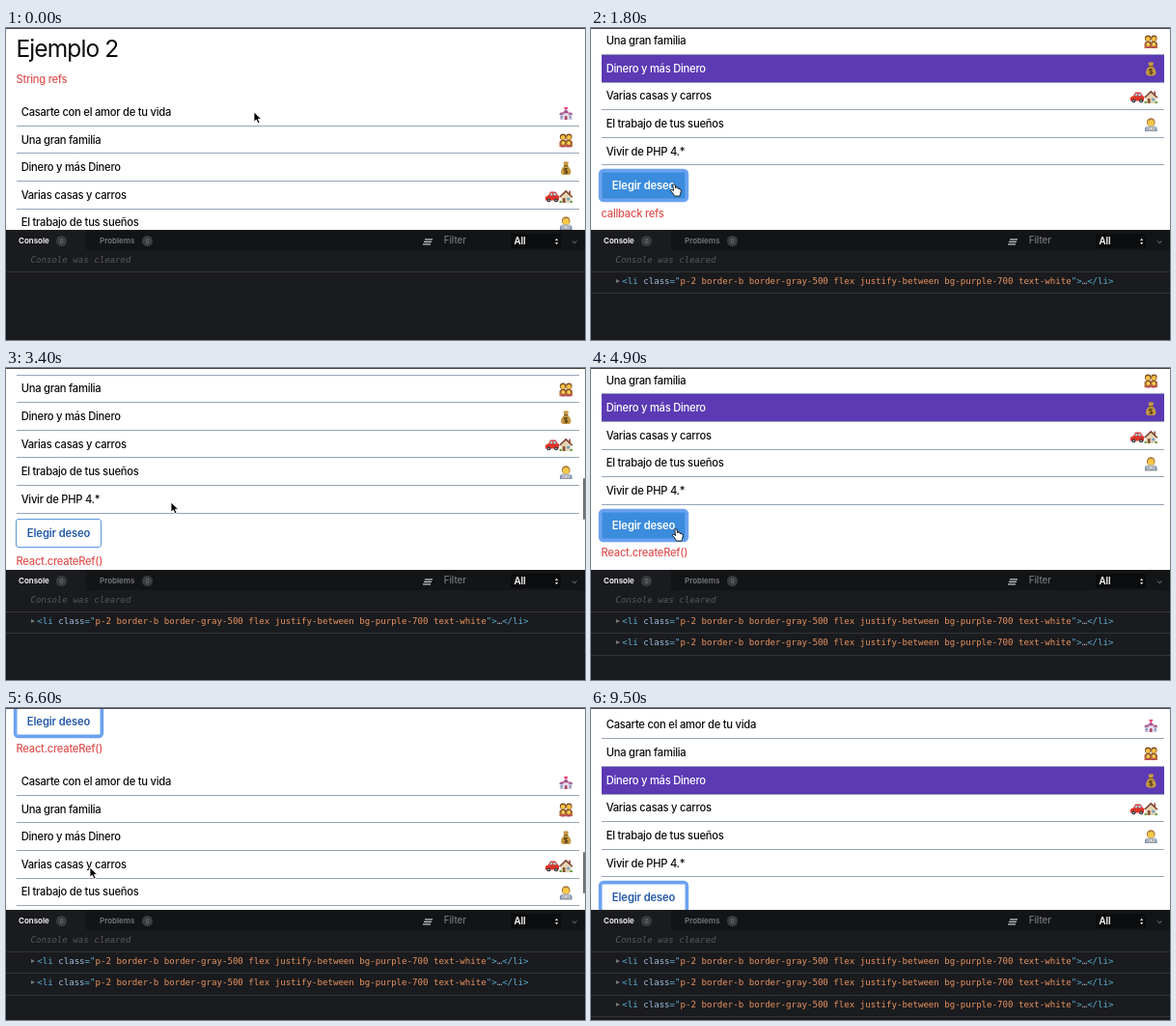
Recreate the animation shown at these times as an HTML page. Size 600 px wide and 323 px high, loop 9.6 s.

```html
<!DOCTYPE html>
<html lang="es">
<head>
<meta charset="utf-8">
<title>Ejemplo 2</title>
<style>
html, body { margin: 0; width: 100%; height: 100%; overflow: hidden; background: #fff; }
#stage { position: relative; width: 600px; height: 323px; overflow: hidden; font: 450 11.2px/20px Inter, Roboto, sans-serif; letter-spacing: -.25px; color: #0b0b0d; }
#stage * { box-sizing: border-box; white-space: pre; }
#page, #bar, #cursor, .section, .section > *, #console, #console > * { position: absolute; margin: 0; }
#page { left: 0; top: 0; width: 600px; }
h1 { position: absolute; left: 10.5px; top: 6px; margin: 0; font: 24.5px/30px Inter, Roboto, sans-serif; letter-spacing: -.9px; }
.section { left: 10.5px; width: 583.5px; }
.section p { top: -10px; left: 0; color: #e05252; }
ul { top: 20.1px; left: 0; width: 100%; padding: 0; list-style: none; }
li { height: 28.65px; padding: 0 6.3px 0 5.2px; line-height: 28px; display: flex; justify-content: space-between; align-items: center; border-bottom: 1px solid #96a3b8; }
li.picked { background: #5b3ab4; color: #fff; }
li svg { width: 14.5px; height: 14.5px; display: inline-block; vertical-align: middle; }
button { top: 197.5px; left: -.4px; width: 89px; height: 30px; padding: 0; border: 1px solid #5b9ade; border-radius: 3px; background: #fff; color: #2359a6; font: 600 11.2px/28px Inter, Roboto, sans-serif; letter-spacing: -.1px; }
button.hover { background: #3b8cdd; color: #fff; }
button.focus { border-color: #6ba2ef; box-shadow: 0 0 0 2.2px #6ba2ef, inset 0 0 0 .5px #6ba2ef; }
#bar { left: 597.7px; width: 2.3px; height: 43px; background: #747474; border-radius: 1px; }
#edge { position: absolute; top: 0; left: 0; width: 600px; height: 1px; background: #444; }
#console { top: 209px; left: 0; width: 600px; height: 114px; background: #1a1b1e; letter-spacing: 0; }
#head { left: 0; top: 0; width: 600px; height: 21px; background: #131416; }
#tab { left: 0; top: 0; width: 83px; height: 21px; background: #1a1b1e; }
.label { top: 1px; font-size: 8px; font-weight: 600; }
.badge { top: 5.5px; width: 11px; height: 11px; border-radius: 50%; background: #3a3c40; color: #77797d; font-size: 6px; line-height: 11px; text-align: center; }
#select { left: 523px; top: 4px; width: 52px; height: 15px; background: #0b0c0d; border-radius: 2px; }
#icons { left: 0; top: .5px; }
.mono, .log { left: 0; width: 600px; font: 9.1px/21px "DejaVu Sans Mono", "Liberation Mono", monospace; border-bottom: 1px solid #303338; }
.mono { top: 21px; height: 23px; padding-left: 25.5px; color: #55585c; font-style: italic; }
.log { height: 22.4px; line-height: 18.6px; padding-left: 32.3px; color: #5db0d7; }
.log::before { content: ""; position: absolute; left: 25.7px; top: 7px; border: 2.5px solid transparent; border-left: 4px solid #77797d; border-right: 0; }
.log i { font-style: normal; color: #9bbbdc; }
.log b { font-weight: normal; color: #e8935f; }
.log u { text-decoration: none; color: #a5a8ac; }
#cursor { width: 14px; height: 16px; overflow: visible; }
</style>
</head>
<body>
<div id="stage">
  <div id="page"><h1>Ejemplo 2</h1></div>
  <div id="bar"></div>
  <div id="edge"></div>
  <div id="console">
    <div id="head"></div>
    <div id="tab"></div>
    <div class="label" style="left:13px;color:#fff">Console</div>
    <div class="badge" style="left:52.3px">0</div>
    <div class="label" style="left:97px;color:#77797d">Problems</div>
    <div class="badge" style="left:141.3px">0</div>
    <div class="label" style="left:453.7px;color:#77797d;font-size:9.7px;font-weight:500">Filter</div>
    <div id="select"></div>
    <div class="label" style="left:526.5px;top:2px;color:#fff;font-size:9.7px">All</div>
    <svg id="icons" width="600" height="21" fill="none" stroke="#c4c6c9">
      <path d="M434 8.8h8M433 11.3h8M432 13.8h8" stroke-width="1.2"/>
      <path d="M569 10l1.6-2.3 1.6 2.3zM569 12l1.6 2.3 1.6-2.3z" fill="#ddd" stroke="none"/>
      <path d="M587 10.5l2.2 2.2 2.2-2.2" stroke="#8b8d91"/>
    </svg>
    <div class="mono">Console was cleared</div>
  </div>
  <svg id="cursor" stroke-linejoin="round">
    <path id="arrow" d="M0 0v10.2l2.4-2.2 1.7 3.8 1.9-.8-1.7-3.7h3.3z" fill="#000" stroke="#fff" stroke-width=".8"/>
    <path id="hand" d="M-1.2 .3Q0-1 1.1 .3L1.7 4Q3-.1 4 4.3 5.4 3.3 5.9 5 7.4 4.3 7.4 6.4L6.6 9.6 6 12H.6L-1.4 8.8-3.7 6.2Q-3.4 4.7-1.7 5.6L-.5 6.6z" fill="#fff" stroke="#111" stroke-width=".9"/>
  </svg>
</div>
<script>
const LOOP = 9600, STEP = 100, PITCH = 241, FIRST = 53;
const $ = id => document.getElementById(id);

const icons = {
  church: `<path d="M1 7.5h12v6H1z" fill="#c9c3d8"/><path d="M4 5.5h6v8H4z" fill="#e3dfea"/>
    <path d="M0 8.5l1.5-2.3h3V8.5zM14 8.5l-1.5-2.3h-3V8.5zM3.2 7L7 3.2 10.8 7z" fill="#a9568e"/>
    <path d="M7 4L5 1.8Q5.3 0 7 1 8.7 0 9 1.8z" fill="#ee3f78"/>
    <path d="M5.7 13.5V10.5Q7 8.5 8.3 10.5v3z" fill="#b04a6c"/><path d="M2 9.8h1.3v2H2zm8.7 0H12v2h-1.3z" fill="#687fb5"/>`,
  family: `<g fill="#7a4a24"><circle cx="4" cy="3.5" r="3.1"/><circle cx="10" cy="3.5" r="3.1"/></g>
    <g fill="#f6c242"><circle cx="4" cy="4.3" r="2.3"/><circle cx="10" cy="4.3" r="2.3"/></g>
    <path d="M.5 13.5V9q0-2 3-2h7q3 0 3 2v4.5z" fill="#b9683b"/>
    <g fill="#7a4a24"><circle cx="4.2" cy="9" r="2.5"/><circle cx="9.8" cy="9" r="2.5"/></g>
    <g fill="#ffd153"><circle cx="4.2" cy="9.7" r="1.9"/><circle cx="9.8" cy="9.7" r="1.9"/></g>
    <path d="M2 14q0-2.2 2.2-2.2T6.5 14zm5.5 0q0-2.2 2.3-2.2T12 14z" fill="#b84861"/>`,
  money: `<path d="M5.3 4.5L4.3 1Q7-.3 9.7 1L8.7 4.5Q12.3 7.5 12 11.5 11.5 14 7 14T2 11.5Q1.7 7.5 5.3 4.5z" fill="#c49a45"/>
    <path d="M4.9 4h4.2v1.2H4.9z" fill="#7d581f"/>
    <path d="M8.8 7.8Q5.2 6.6 5.2 8.4c0 1.6 3.5.9 3.5 2.5Q8.7 12.4 5 11.4M7 6.7v6" fill="none" stroke="#5b3e10"/>`,
  car: `<path d="M3 6l2-3.5h5L12.5 6l1.5 1v4H0V7.5z" fill="#dc3529"/>
    <path d="M4.2 6l1.3-2.5H7V6zM8 3.5h1.6L11.3 6H8z" fill="#9fd2ec"/>
    <g fill="#303137"><circle cx="3.3" cy="11" r="1.9"/><circle cx="10.7" cy="11" r="1.9"/></g>
    <g fill="#bbb"><circle cx="3.3" cy="11" r=".8"/><circle cx="10.7" cy="11" r=".8"/></g>`,
  house: `<path d="M2 6.5l5-4.5 5 4.5v7H2z" fill="#e4d3b4"/><path d="M10 1.5h1.6v4H10z" fill="#9a4a35"/>
    <path d="M0 7.5L7 .8l7 6.7-1 1-6-5.6-6 5.6z" fill="#7d4234"/>
    <path d="M3.7 8.8h2.6v4.7H3.7z" fill="#87512e"/><path d="M8 8.5h2.7V11H8z" fill="#6da3c8"/>
    <g fill="#5d9c3e"><circle cx="12.3" cy="12.6" r="1.2"/><circle cx="1.6" cy="12.6" r="1.2"/></g>`,
  worker: `<circle cx="7" cy="4.5" r="4.2" fill="#a8793a"/>
    <circle cx="7" cy="5.2" r="3.2" fill="#f8c947"/><path d="M1 13.5V11q0-2.5 4-2.5h4q4 0 4 2.5v2.5z" fill="#6789b2"/>
    <path d="M2.3 8.3h9.4v5H2.3z" fill="#b3b8bf"/><path d="M.8 13h12.4v1H.8z" fill="#8b9098"/><circle cx="7" cy="10.8" r=".8" fill="#eee"/>`
};
const wishes = [
  ["Casarte con el amor de tu vida", "church"], ["Una gran familia", "family"],
  ["Dinero y más Dinero", "money"], ["Varias casas y carros", "car", "house"],
  ["El trabajo de tus sueños", "worker"], ["Vivir de PHP 4.*"]
];
const draw = name => `<svg viewBox="0 0 14 14">${icons[name]}</svg>`;
const rows = wishes.map(([text, ...art]) => `<li><span>${text}</span><span>${art.map(draw).join("")}</span></li>`).join("");

["String refs", "callback refs", "React.createRef()"].forEach((title, i) => {
  $("page").insertAdjacentHTML("beforeend",
    `<div class="section" style="top:${FIRST + PITCH * i}px"><p>${title}</p><ul>${rows}</ul><button>Elegir deseo</button></div>`);
  $("console").insertAdjacentHTML("beforeend",
    `<div class="log" style="top:${44 + 22.3 * i}px">&lt;li <i>class</i>="<b>p-2 border-b border-gray-500 flex justify-between bg-purple-700 text-white</b>"&gt;<u>…</u>&lt;/li&gt;</div>`);
});
const buttons = [...document.querySelectorAll("button")];
const picks = [...document.querySelectorAll("li:nth-child(3)")];
const logs = [...document.querySelectorAll(".log")];

// Key lists hold [time, ...values]
const scrollKeys = [[0, 0], [300, 48], [600, 92], [800, 102], [1000, 102.5], [2100, 102.5], [2500, 198.5],
  [3000, 300], [3500, 344], [5200, 344], [5700, 406.7], [6100, 425], [6200, 425], [6700, 510], [7100, 551.5]];
const mouseKeys = [[0, 257, 86.5], [1100, 257, 86.5], [1600, 86, 162], [2000, 86, 162], [2400, 170.5, 138.5],
  [3900, 170.5, 138.5], [4400, 87.5, 167], [5200, 87.5, 167], [5300, 86.7, 165], [7300, 86.7, 165],
  [7700, 74, 185], [8900, 74, 185], [9100, 156, 66]];
const focusTimes = [1700, 4600, 8000], clickTimes = [1700, 4600, 8100];
const barTimes = [[100, 1500], [2100, 4000], [5200, 7700]];

function at(keys, t) {
  const i = keys.findIndex(k => k[0] > t);
  if (i < 0) return keys[keys.length - 1].slice(1);
  const a = keys[i - 1], b = keys[i], u = (t - a[0]) / (b[0] - a[0]);
  return a.slice(1).map((v, j) => v + (b[j + 1] - v) * u);
}

function render(t) {
  const [scroll] = at(scrollKeys, t), [x, y] = at(mouseKeys, t);
  $("page").style.top = -scroll + "px";
  $("bar").style.top = 38.5 + .225 * scroll + "px";
  $("bar").hidden = !barTimes.some(([from, to]) => t >= from && t < to);
  const focus = focusTimes.filter(f => t >= f).length - 1;
  let over = false;
  buttons.forEach((button, i) => {
    const top = FIRST + PITCH * i + 197.5 - scroll;
    const hover = x > 10 && x < 100 && y > top && y < top + 30;
    over ||= hover;
    button.classList.toggle("hover", hover);
    button.classList.toggle("focus", i === focus);
    picks[i].classList.toggle("picked", t >= clickTimes[i]);
    logs[i].hidden = t < clickTimes[i];
  });
  $("cursor").style.cssText = `left:${x}px;top:${y}px;display:${t < 9200 ? "block" : "none"}`;
  $("arrow").style.display = over ? "none" : "";
  $("hand").style.display = over ? "" : "none";
}

const start = performance.now();
(function tick() {
  const t = (performance.now() - start) % LOOP;
  render(Math.floor(t / STEP) * STEP);
  requestAnimationFrame(tick);
})();
</script>
</body>
</html>
```
